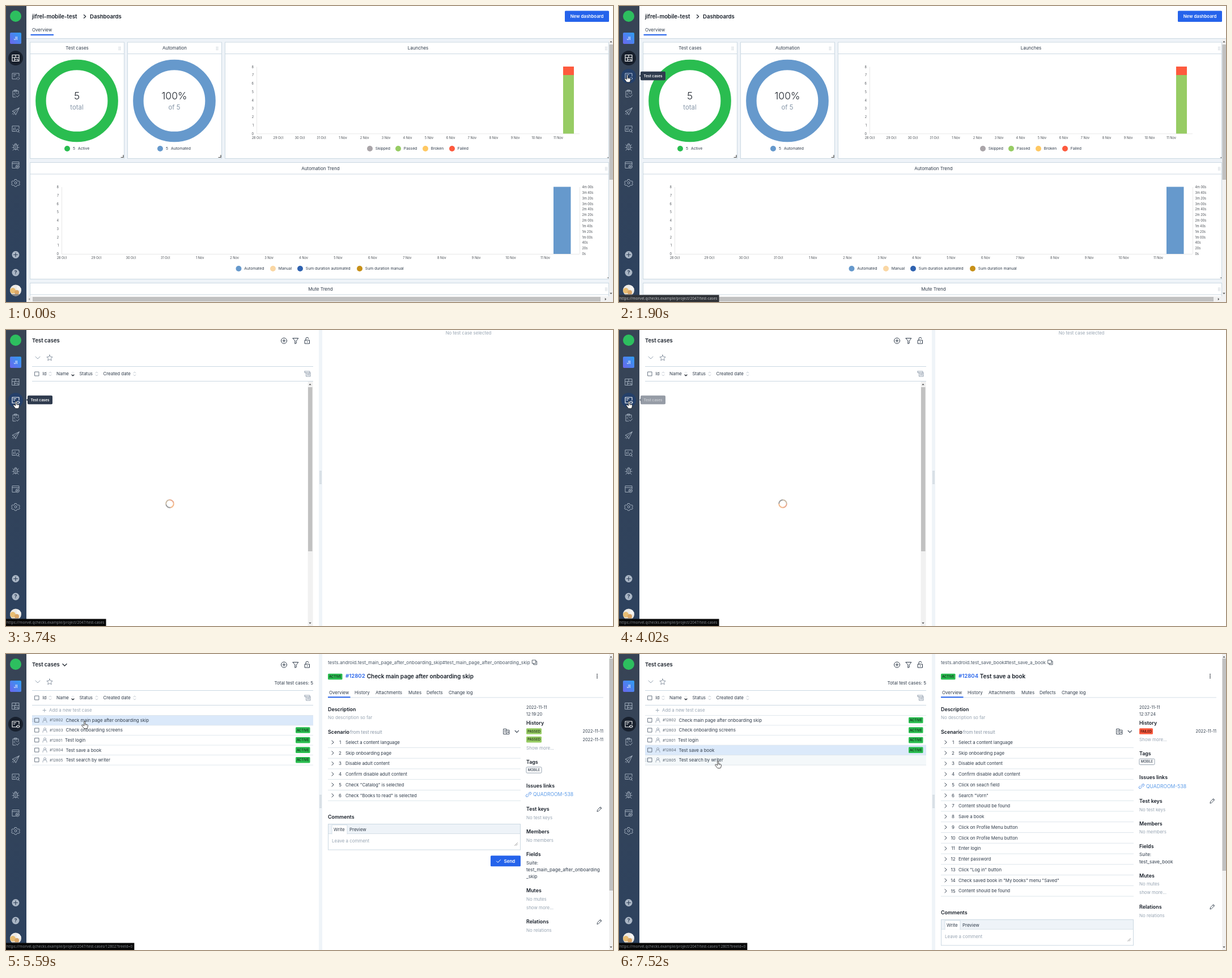
Animation of 1071 by 523 pixels, one loop 8000 ms. Source, as an HTML page with a canvas:

```html
<!DOCTYPE html>
<html lang="en">
<head>
<meta charset="utf-8">
<title>Test dashboard walkthrough</title>
<style>
html, body { margin: 0; width: 100%; height: 100%; overflow: hidden; background: #fff; }
canvas { display: block; width: 1071px; height: 523px; }
</style>
</head>
<body>
<canvas id="stage"></canvas>
<script>
const W = 1071, H = 523, LOOP = 8000;
const canvas = document.getElementById('stage');
const ctx = canvas.getContext('2d');
const ratio = window.devicePixelRatio || 1;
canvas.width = W * ratio;
canvas.height = H * ratio;

const INK = '#2f3b4a', DARK = '#161d27', MUTED = '#98a5b3', LINE = '#cbd8e2';
const BLUE = '#2563eb', GREEN = '#2abd50', STEEL = '#6699cc', PALE = '#eef3f8';
const PASS = '#97cc64', FAIL = '#fd5a3e';
const BODY = 7.9, CODE = 8.2, SMALL = 6.8;

// ---------- helpers ----------
function rect(x, y, w, h, color) {
  ctx.fillStyle = color;
  ctx.fillRect(x, y, w, h);
}
function frame(x, y, w, h, color = LINE) {
  ctx.strokeStyle = color;
  ctx.lineWidth = 1;
  ctx.strokeRect(x + 0.5, y + 0.5, w - 1, h - 1);
}
function round(x, y, w, h, r, color) {
  ctx.fillStyle = color;
  ctx.beginPath();
  ctx.roundRect(x, y, w, h, r);
  ctx.fill();
}
function dot(x, y, r, color) {
  ctx.fillStyle = color;
  ctx.beginPath();
  ctx.arc(x, y, r, 0, 7);
  ctx.fill();
}
// y is the middle of the capital letters
function text(str, x, y, size = BODY, color = INK, weight = 400, align = 'left', family = 'Inter') {
  ctx.font = `${weight} ${size}px ${family}, sans-serif`;
  ctx.textAlign = align;
  ctx.fillStyle = color;
  ctx.fillText(str, x, y + size * 0.364);
}
const bold = (str, x, y, size = 8.9, color = DARK) => text(str, x, y, size, color, 600);
function path(d, x, y, stroke, width = 0.9, fill) {
  const p = new Path2D(d);
  ctx.save();
  ctx.translate(x, y);
  ctx.lineJoin = ctx.lineCap = 'round';
  if (fill) { ctx.fillStyle = fill; ctx.fill(p); }
  if (stroke) { ctx.strokeStyle = stroke; ctx.lineWidth = width; ctx.stroke(p); }
  ctx.restore();
}
function withAlpha(a, draw) {
  if (a <= 0) return;
  ctx.save();
  ctx.globalAlpha = a;
  draw();
  ctx.restore();
}
// last value whose time has come
function step(keys, t, first) {
  let v = first;
  for (const [at, value] of keys) if (t >= at) v = value;
  return v;
}
// linear motion through [time, value...] keys
function track(keys, t) {
  if (t <= keys[0][0]) return keys[0].slice(1);
  for (let i = 1; i < keys.length; i++) {
    const [a, b] = [keys[i - 1], keys[i]];
    if (t < b[0]) {
      const k = (t - a[0]) / (b[0] - a[0]);
      return a.slice(1).map((v, j) => v + (b[j + 1] - v) * k);
    }
  }
  return keys[keys.length - 1].slice(1);
}

// ---------- timeline ----------
const OPEN_LIST = 3470, LIST_READY = 4220, OPEN_FIRST = 5180, OPEN_SECOND = 7060;
const pointer = [
  [260, 862, 432], [390, 680, 325], [650, 680, 325], [1420, 14, 121], [2499, 14, 121],
  [2500, 15, 122], [2650, 15, 122], [2960, 17, 142], [3100, 17, 143], [3400, 17, 125],
  [4350, 17, 125], [4670, 82, 75], [5030, 138, 118], [5640, 138, 118], [5940, 142, 137],
  [5990, 142, 137], [6070, 142, 141], [6320, 142, 141], [6710, 149, 164], [6910, 151, 167],
  [7160, 151, 167], [7500, 174, 188]
];
const casesTip = [[1490, 0], [1760, 1], [2870, 1], [3110, 0], [3180, 0], [3390, 1], [3900, 1], [4140, 0]];
const plansTip = [[2870, 0], [3110, 1], [3180, 1], [3390, 0]];
const menuHover = [[1400, 1], [2850, 2], [3250, 1], [OPEN_FIRST, -1]];
const rowHover = [[4900, 0], [5830, 1], [6580, 2], [6800, 3], [7390, 4]];
const statusKeys = [
  [1490, '/test-cases'], [2880, '/testplans'], [3280, '/test-cases'], [4480, ''],
  [4920, 12802], [5850, 12803], [6600, 12801], [6820, 12804], [7410, 12805]
];

// ---------- sidebar ----------
const ring = (x, y, r) => `M${x + r} ${y}a${r} ${r} 0 1 1 ${-2 * r} 0a${r} ${r} 0 1 1 ${2 * r} 0z`;
const menu = [
  [92, 'M-6-5.5h12v11h-12zM-6-1h12M0-5.5v4.5M-2-1v6.5M-2 2.5h3M3 1.5v2h3'],
  [124, 'M6 0v-5h-12v10h7M-3.5-2.5h4M-3.5 0h2M3.5 2l-2 2 2 2M5 2l2 2-2 2'],
  [155, 'M5 0v-5h-10v11h5M-2-6.5h4v2.5h-4zM-1-1.5l-2 2 2 2M1-1.5l2 2M1 4l2 2 3.5-4'],
  [186, 'M6-6l-12 6 4 2 2 4zM-2 2l8-8M-4 3l-2 2M-2 4l-2 2'],
  [217.5, 'M6-1v-4.5h-12v9.5h6M-3.5 1.5v-3M-1 1.5v-4.5M6.5 6l-1.5-1.5' + ring(3.5, 2.5, 2.3)],
  [249, 'M-3-1a3 3 0 0 1 6 0v3a3 3 0 0 1-6 0zM0-2v7M-6 1h3M3 1h3M-5-4l2 2.5M5-4l-2 2.5M-5 6l2-2M5 6l-2-2M-2-4a2 2 0 0 1 4 0'],
  [281, 'M6 0v-5.5h-12v11h6M-6-2.5h12M2.5 1.8l2 1.2-2 1.2z' + ring(3.2, 3, 3.1)],
  [312.5, 'M-1.5-6h3l.5 2 2 1 2-.5 1.5 2.5-1.5 1 0 1 1.5 1-1.5 2.5-2-.5-2 1-.5 1.5h-3l-.5-1.5-2-1-2 .5-1.5-2.5 1.5-1 0-1-1.5-1 1.5-2.5 2 .5 2-1z' + ring(0, 0, 2)]
];

function tooltip(label, y, w, alpha) {
  withAlpha(alpha, () => {
    path('M-3 0l3-3v6z', 39, y, null, 0, '#2f3b4e');
    round(38, y - 7.7, w, 15.4, 2, '#2f3b4e');
    bold(label, 43.5, y, 6.4, '#fff');
  });
}

function sidebar(t) {
  const g = ctx.createLinearGradient(0, 0, 0, H);
  g.addColorStop(0, '#384455');
  g.addColorStop(1, '#2d425f');
  rect(0, 0, 36, H, g);
  dot(17, 18, 10, '#2dbf5f');

  const p = ctx.createLinearGradient(7, 66, 27, 48);
  p.addColorStop(0, '#6a67ee');
  p.addColorStop(1, '#2f9df0');
  round(7, 47, 20, 20, 2, p);
  text('JI', 17, 57, 7.7, '#fff', 500, 'center');

  const active = t < OPEN_LIST ? 0 : 1, hover = step(menuHover, t, -1);
  menu.forEach(([y, d], i) => {
    if (i === hover) dot(17, y, 13, '#25406a');
    else if (i === active) dot(17, y, 13, '#18202d');
    path(d, 17, y, i === active ? '#fff' : i === hover ? '#c9d9ef' : '#aab6c5', i === active ? 1.1 : 0.9);
  });
  dot(17, 439.5, 6.5, '#aab6c5');
  path('M-3.5 0h7M0-3.5v7', 17, 439.5, '#2f4059', 1.2);
  dot(17, 471, 6.5, '#aab6c5');
  text('?', 17, 471, 9, '#2f4059', 700, 'center');

  // soft round portrait
  ctx.save();
  ctx.beginPath();
  ctx.arc(17, 502.5, 10, 0, 7);
  ctx.clip();
  rect(7, 492, 20, 21, '#eceae6');
  dot(12, 503, 5, '#e8bd73');
  dot(19, 506, 4, '#d9a566');
  dot(23, 498, 4, '#f8f6f2');
  rect(7, 509, 20, 4, '#8d8a86');
  ctx.restore();
}

// ---------- dashboard ----------
function grip(x, y) {
  for (let i = 0; i < 6; i++) rect(x - 1.7 + (i % 2) * 2.4, y - 2.8 + (i >> 1) * 2.3, 1, 1, '#95a3b2');
}
function card(x, y, w, h, title) {
  rect(x, y, w, h, '#fff');
  frame(x, y, w, h);
  rect(x, y + 20.5, w, 1, LINE);
  text(title, x + w / 2 + (w > 600 ? 2 : 0), y + 11, 8, INK, 400, 'center');
  grip(w > 600 ? 1059 : x + w - 8.5, y + 11.5);
}
function donut(x, color, big, small, label) {
  ctx.strokeStyle = color;
  ctx.lineWidth = 18.5;
  ctx.beginPath();
  ctx.arc(x, 167.5, 63.6, 0, 7);
  ctx.stroke();
  text(big, x, 159, 17.6, '#20262e', 300, 'center');
  text(small, x, 178.5, 11.4, '#8797a9', 400, 'center');
  path('M0 4h4v-4', x + 78, 263.5, '#444', 1.2);
  const left = x - (label === 'Active' ? 17 : 25);
  dot(left, 252, 5, color);
  text('5', left + 10, 252, SMALL);
  text(label, left + 19, 252, SMALL);
}
function axes(x0, x1, top, pitch) {
  const base = top + 118;
  rect(x0, top, 0.7, 118, '#dfdfdf');
  rect(x0, base, x1 - x0, 0.7, '#dfdfdf');
  for (let i = 0; i <= 8; i++) text(i, x0 - 5, base - i * 14.72, 5.5, '#4a4f55', 400, 'right');
  for (let i = 0; i < 15; i++) {
    text(i < 4 ? `${28 + i} Oct` : `${i - 3} Nov`, x0 + 0.5 + i * pitch, base + 7, 5.6, '#4a4f55', 400, 'center');
  }
}
function legend(y, items) {
  for (const [x, label, color] of items) {
    dot(x, y, 5, color);
    text(label, x + 9.8, y, SMALL);
  }
}
const triangle = (x, y, d, color = '#555') => path(d, x, y, null, 0, color);
const UP = 'M-2.2 1.2l2.2-2.4 2.2 2.4z', DOWN = 'M-2.2-1.2l2.2 2.4 2.2-2.4z';
function scrollbar(x, y0, y1, thumb0, thumb1, w = 7) {
  rect(x, y0, w + 1, y1 - y0, '#f1f1f1');
  rect(x + 0.5, thumb0, w - 0.5, thumb1 - thumb0, '#c1c1c1');
  triangle(x + w / 2, y0 + 5, UP);
  triangle(x + w / 2, y1 - 5, DOWN);
}

function dashboard() {
  rect(36, 57, W - 36, H - 57, PALE);
  rect(36, 57, W - 36, 1, LINE);
  bold('jifrel-mobile-test', 46, 18.5, 9.75);
  path('M-1.7-3l3.4 3-3.4 3', 139, 18.5, DARK, 1.1);
  bold('Dashboards', 148, 18.5, 9.6);
  text('Overview', 46, 42);
  rect(43.5, 50, 40.5, 2, BLUE);
  round(986, 8.5, 78, 19.5, 1.5, BLUE);
  text('New dashboard', 1025, 18.5, 7.7, '#fff', 600, 'center');

  card(42, 63.5, 167, 206.5, 'Test cases');
  card(214, 63.5, 167, 206.5, 'Automation');
  card(386, 63.5, 678, 206.5, 'Launches');
  card(42, 276, 1022, 207, 'Automation Trend');
  card(42, 489, 1022, 60, 'Mute Trend');

  donut(125, GREEN, '5', 'total', 'Active');
  donut(297, STEEL, '100%', 'of 5', 'Automated');

  axes(442, 1012, 107.5, 38);
  rect(983, 107, 19, 15, FAIL);
  rect(983, 122, 19, 103.5, PASS);
  legend(252, [[642, 'Skipped', '#aaa5a9'], [692, 'Passed', PASS], [740, 'Broken', '#ffc862'], [787, 'Failed', FAIL]]);

  axes(98, 1012, 320, 60.93);
  rect(966, 319.5, 30.5, 118.5, STEEL);
  rect(1012, 320, 0.7, 118, '#dfdfdf');
  for (let i = 0; i <= 12; i++) {
    const m = Math.floor(i / 3), s = (i % 3) * 20;
    text(m ? `${m}m ${s || '00'}s` : `${s}s`, 1016.5, 438 - i * 9.83, 5.5, '#4a4f55');
  }
  legend(464, [[410.5, 'Automated', STEEL], [471, 'Manual', '#fad7a4'],
    [519, 'Sum duration automated', '#2f62b0'], [624, 'Sum duration manual', '#c79018']]);
  rect(1061.5, 267, 1.5, 1.5, '#555');
  rect(1061.5, 479.5, 1.5, 1.5, '#555');

  scrollbar(1064, 58, 513, 68, 307);
  rect(36, 513, W - 36, 10, '#f1f1f1');
  rect(47, 514, 1002, 8, '#c1c1c1');
  triangle(41, 518, 'M1.2-2.2l-2.4 2.2 2.4 2.2z', '#999');
  triangle(1058, 518, 'M-1.2-2.2l2.4 2.2-2.4 2.2z');
}

// ---------- list ----------
const rows = [
  [12802, 'Check main page after onboarding skip'], [12803, 'Check onboarding screens'],
  [12801, 'Test login'], [12804, 'Test save a book'], [12805, 'Test search by writer']
];
const rowY = i => 117 + i * 17.55;

function badge(label, x, y, w, color, ink = '#14331d') {
  round(x, y - 5.3, w, 10.6, 1.5, color);
  text(label, x + w / 2, y, 5.8, ink, 600, 'center');
}
function checkbox(y) { path('M-3.5-3.5h7v7h-7z', 54.5, y, '#596675', 0.9); }
function sorter(x, dark) {
  path('M-2-1.5l2-2 2 2', x, 77.5, dark ? '#d5dae0' : '#b4bdc7', 0.8);
  path('M-2 1.5l2 2 2-2', x, 77.5, dark ? DARK : '#b4bdc7', dark ? 1.1 : 0.8);
}
// row highlight fades in and out over a quarter of a second
function glow(i, t) {
  const k = rowHover.findIndex(([, row]) => row === i);
  const on = rowHover[k][0], off = rowHover[k + 1]?.[0] ?? LOOP;
  return track([[on, 0], [on + 150, 1], [off, 1], [off + 250, 0]], t)[0];
}

function listPane(t) {
  const ready = t >= LIST_READY;
  bold('Test cases', 46, 19, 9.4);
  if (ready && t < OPEN_SECOND) path('M-3.5-1.8l3.5 3.6 3.5-3.6', 103.5, 19.3, DARK, 1.2);
  path(ring(0, 0, 5) + 'M-2.5 0h5M0-2.5v5', 490.5, 19, INK, 1);
  path('M-4.8-4.5h9.6l-3.6 4.8v4l-2.4 1v-5z', 511, 19, INK, 1);
  path('M-4-1h8v6h-8zM-2.5-1v-2.2a2.4 2.4 0 0 1 4.8-.6M0 1.5v1', 531.5, 19, INK, 1);
  path('M-4-2l4 4 4-4', 56, 49, MUTED, 1);
  path('M0-5l1.5 3.4 3.6.3-2.7 2.5.8 3.6-3.2-1.9-3.2 1.9.8-3.6-2.7-2.5 3.6-.3z', 77, 49, '#7f8c9a', 0.9);
  rect(46, 64, 496, 1, LINE);
  rect(46, 90, 496, 1, LINE);
  checkbox(77.5);
  [['Id', 64.5, 78], ['Name', 89, 118], ['Status', 129.5, 160], ['Created date', 171.5, 227]].forEach(([s, x, sx], i) => {
    text(s, x, 77.5);
    sorter(sx, i === 1);
  });
  path('M-5-4.5h9v3M-5-4.5v2.5h9M-2.5-2v6.5h7.5v-6.5M-.5 0h4M-.5 2h4', 532, 77.5, '#8795a5', 0.9);

  if (!ready) {
    scrollbar(532.5, 91, 523, 101, 391, 8);
    const spin = (t - 4020) / 1000 * Math.PI * 2;
    ['#e9a98c', '#f4b98a', '#9c9c9c', '#c9b9a4'].forEach((c, i) => {
      ctx.strokeStyle = c;
      ctx.lineWidth = 2;
      ctx.beginPath();
      ctx.arc(289, 307, 6.8, spin + i * Math.PI / 2, spin + (i + 1) * Math.PI / 2);
      ctx.stroke();
    });
    return;
  }

  text('Total test cases: 5', 542, 51.5, 8, INK, 400, 'right');
  path('M-2.8 0h5.6M0-2.8v5.6', 67.8, 99.5, MUTED, 0.9);
  text('Add a new test case', 76, 99.5, BODY, MUTED);
  const hover = step(rowHover, t, -1);
  const selected = step([[OPEN_FIRST, 0], [OPEN_SECOND, 3]], t, -1);
  rows.forEach(([id, name], i) => {
    const y = rowY(i);
    if (i === selected) rect(46, y - 8.5, 496, 17.5, '#dbe9fa');
    else withAlpha(glow(i, t), () => rect(46, y - 8.5, 496, 17.5, '#f3f7fa'));
    rect(46, y - 9, 496, 0.8, '#dae3ea');
    if (i === hover) grip(48, y);
    checkbox(y);
    path(ring(0, -2, 2) + 'M-3.5 4v-1a3 3 0 0 1 7 0v1', 68.5, y, '#8391a1', 0.8);
    text('#' + id, 77, y, 6.7, '#56626f');
    text(name, i === 2 ? 104 : 105.5, y);
    if (i !== hover) badge('ACTIVE', 511, y, 25.5, GREEN);
  });
  rect(46, rowY(5) - 9, 496, 0.8, '#dae3ea');
}

// ---------- details ----------
const opening = ['Select a content language', 'Skip onboarding page', 'Disable adult content', 'Confirm disable adult content'];
const first = {
  id: 12802, name: rows[0][1], time: '12:19:20', runs: ['PASSED', 'PASSED'], thumb: 418,
  path: 'tests.android.test_main_page_after_onboarding_skip#test_main_page_after_onboarding_skip',
  suite: ['test_main_page_after_onboarding', '_skip'],
  steps: [...opening, 'Check "Catalog" is selected', 'Check "Books to read" is selected']
};
const second = {
  id: 12804, name: rows[3][1], time: '12:37:24', runs: ['FAILED'], thumb: 383,
  path: 'tests.android.test_save_book#test_save_a_book', suite: ['test_save_book'],
  steps: [...opening, 'Click on seach field', 'Search "Vorn"', 'Content should be found', 'Save a book',
    'Click on Profile Menu button', 'Click on Profile Menu button', 'Enter login', 'Enter password',
    'Click "Log in" button', 'Check saved book in "My books" menu "Saved"', 'Content should be found']
};
const PENCIL = 'M-4 4l.6-2.6 5.2-5.2 2 2-5.2 5.2zM.8-2.8l2 2';

function details(d) {
  text(d.path, 568, 15, CODE, '#4b5866');
  const end = 568 + ctx.measureText(d.path).width;
  path('M-4-4h6v6h-6zM-2 2v2h6v-6h-2', end + 8, 14.8, INK, 0.8);
  badge('ACTIVE', 568, 40, 25.5, GREEN);
  bold('#' + d.id, 599, 39, 9.6, BLUE);
  bold(d.name, 636.8, 39, 9.95);
  [-3.2, 0, 3.2].forEach(k => dot(1043, 39 + k, 0.9, DARK));
  [['Overview', 570], ['History', 615], ['Attachments', 652], ['Mutes', 710], ['Defects', 742], ['Change log', 781]]
    .forEach(([s, x]) => text(s, x, 68));
  rect(568, 76.5, 486, 0.8, LINE);
  rect(568, 75.3, 39.5, 2, BLUE);

  bold('Description', 568, 97.5);
  text('No description so far', 568, 112.3, BODY, MUTED);
  bold('Scenario', 568, 137.5);
  text('from test result', 607, 137.8, BODY, '#8492a2');
  path('M-5-4.5h5v9h-5zM0-2.5h5v7h-5M-3.5-1.5h2M-3.5 1h2M1.5 1h2.5M3 0l1 1-1 1', 883, 137, INK, 0.9);
  path('M-3.2-1.6l3.2 3.2 3.2-3.2', 901.3, 137, INK, 1.1);
  d.steps.forEach((s, i) => {
    const y = 156 + i * 18.76;
    path('M-1.6-3l3.2 3-3.2 3', 576.5, y, INK, 1);
    text(i + 1, 589.5, y, BODY, INK, 400, 'center');
    text(s, 599, y, 7.8);
    rect(568, y + 9, 340, 0.8, '#d5dfe7');
  });

  const c = 156 + (d.steps.length - 1) * 18.76 + 38.2;
  bold('Comments', 568, c);
  rect(568, c + 12, 340, 17, PALE);
  frame(568, c + 12, 340, 46.5);
  rect(568, c + 29, 340, 0.8, LINE);
  rect(575, c + 14, 27, 16, '#fff');
  path('M0 16v-16h27v16', 575, c + 14, LINE, 0.8);
  text('Write', 578, c + 22.3);
  text('Preview', 606, c + 22.3);
  text('Leave a comment', 575, c + 42.3, BODY, MUTED);
  path('M-2.5 2.5l5-5M0 2.5l2.5-2.5', 900, c + 48, '#777', 0.7);
  round(855, c + 68.3, 53, 19, 1.5, BLUE);
  path('M-3.5 0l2.4 2.4 4.6-4.8', 869, c + 78, '#fff', 1);
  bold('Send', 878.5, c + 78, 8, '#fff');

  const X = 918, gray = (s, y) => text(s, X, y, BODY, MUTED);
  text('2022-11-11', X, 94, 7.3);
  text(d.time, X, 106.5, 7.3);
  bold('History', X, 121.5);
  d.runs.forEach((r, i) => {
    const y = 136.5 + i * 14.6, bad = r === 'FAILED';
    badge(r, X, y, bad ? 24 : 27, bad ? FAIL : PASS, bad ? '#43130b' : '#26391a');
    text('2022-11-11', 1054, y, 7.3, INK, 400, 'right');
  });
  const o = (d.runs.length - 2) * 14.6;
  gray('Show more...', 165.7 + o);
  bold('Tags', X, 190.3 + o);
  ctx.strokeStyle = '#8c99a8';
  ctx.lineWidth = 0.9;
  ctx.beginPath();
  ctx.roundRect(X, 199.8 + o, 27, 10.4, 1.5);
  ctx.stroke();
  text('MOBILE', X + 13.5, 205 + o, 5.7, INK, 500, 'center');
  bold('Issues links', X, 232.8 + o);
  path('M-1 1l3-3M0-2l1.5-1.5a1.8 1.8 0 0 1 2.6 2.6l-1.8 1.8M0 2l-1.5 1.5a1.8 1.8 0 0 1-2.6-2.6l1.8-1.8', 922, 248.3 + o, '#4f8fe8', 1);
  text('QUADROOM-538', 930, 248.3 + o, 8.6, '#5b9be8');
  bold('Test keys', X, 274 + o);
  path(PENCIL, 1047, 274 + o, INK, 0.9);
  gray('No test keys', 289.3 + o);
  bold('Members', X, 314.2 + o);
  gray('No members', 329.2 + o);
  bold('Fields', X, 354 + o);
  text('Suite:', X, 369 + o);
  d.suite.forEach((s, i) => text(s, X, 381.2 + o + i * 12, CODE));
  const q = o + (d.suite.length - 2) * 12;
  bold('Mutes', X, 418.2 + q);
  gray('No mutes', 433.2 + q);
  gray('show more...', 448.2 + q);
  bold('Relations', X, 473.2 + q);
  path(PENCIL, 1047, 473 + q, INK, 0.9);
  gray('No relations', 488.4 + q);
  scrollbar(1064, 0, 523, 8, d.thumb);
}

function casesPage(t) {
  listPane(t);
  rect(552, 0, 6, H, '#eff4f8');
  for (let y = 249; y < 273; y += 2) rect(553, y, 4, 0.8, '#b9c3cd');
  const d = step([[5500, first], [7250, second]], t, null);
  if (d) details(d);
  else text('No test case selected', 816, 5.5, BODY, MUTED, 400, 'center');
}

// ---------- overlays ----------
function statusBar(t) {
  const key = step(statusKeys, t, '');
  if (!key) return;
  const tail = typeof key === 'number' ? `/test-cases/${key}?treeId=0` : key;
  const url = 'https://morvel.qchecks.example/project/2047' + tail;
  const light = t < OPEN_LIST;
  withAlpha(Math.min(1, (t - 1450) / 250), () => {
    ctx.font = '400 6.6px "Open Sans", sans-serif';
    rect(0, 510.5, ctx.measureText(url).width + 4, 12.5, light ? '#303338' : '#070707');
    text(url, 0.8, 517, 6.6, light ? '#c6c9cd' : '#858a91', 400, 'left', '"Open Sans"');
  });
}
function drawPointer(t) {
  if (t < 260) return;
  const [x, y] = track(pointer, t);
  const link = x < 36 || (t >= LIST_READY && y > 108 && y < 196);
  if (link) {
    path('M-1.1 1a1.1 1.1 0 0 1 2.2 0v4l3.4.8q1.5.4 1.3 2l-.6 3q-.3 2-2 2h-3q-1.2 0-2-1.2l-3-4q-.6-1.4.8-1.6l2.9 1.4z', x + 0.7, y + 1, '#1a1a1a', 0.8, '#fff');
    path('M1.3 5v2M3 5.5v2', x + 0.7, y + 1, '#555', 0.5);
  } else {
    path('M0 0v10l2.4-2.2 1.6 3.6 1.5-.7-1.6-3.4h3.2z', x, y, '#1a1a1a', 0.7, '#fff');
  }
}

function draw(t) {
  ctx.setTransform(ratio, 0, 0, ratio, 0, 0);
  rect(0, 0, W, H, '#fff');
  if (t < OPEN_LIST) dashboard();
  else casesPage(t);
  sidebar(t);
  tooltip('Test cases', 123.5, 44, track(casesTip, t)[0]);
  tooltip('Test plans', 155, 43, track(plansTip, t)[0]);
  statusBar(t);
  drawPointer(t);
}

let start;
function tick(now) {
  start ??= now;
  draw((now - start) % LOOP);
  requestAnimationFrame(tick);
}
requestAnimationFrame(tick);
</script>
</body>
</html>
```
